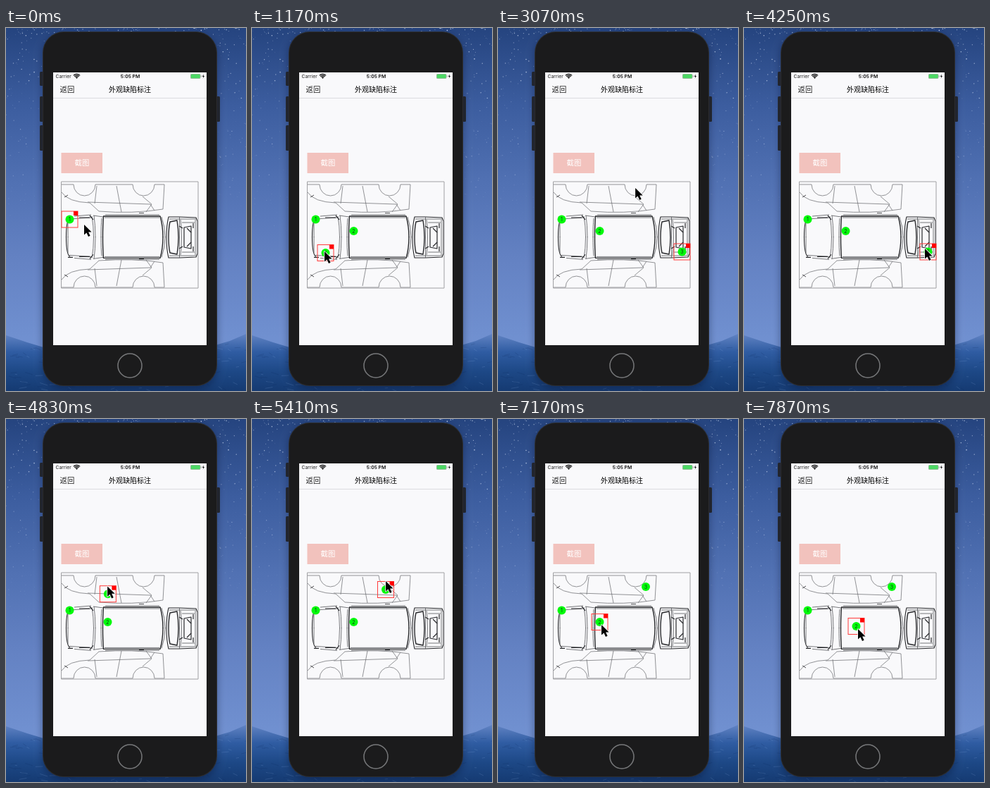
Animation of 341x515 px, one loop 8 s. Source, as an HTML page with a canvas:

```html
<!DOCTYPE html>
<html lang="zh-CN">
<head>
<meta charset="utf-8">
<title>外观缺陷标注</title>
<style>
html, body { margin: 0; width: 100%; height: 100%; overflow: hidden; background: #1b1b1b; }
canvas { display: block; width: 341px; height: 515px; }
</style>
</head>
<body>
<canvas id="stage"></canvas>
<script>
const W = 341, H = 515, LOOP = 8000, TICK = 117.4;
const LATIN = '"Inter", "Roboto", sans-serif';
const HAN = '"Noto Sans CJK SC", "Noto Sans CJK", sans-serif';
const PALE = '#77787c', INK = '#55565a', DARK = '#26272a';
const dpr = window.devicePixelRatio || 1;

function sized(c) {
  c.width = W * dpr;
  c.height = H * dpr;
  const g = c.getContext('2d');
  g.scale(dpr, dpr);
  return g;
}

const view = sized(document.getElementById('stage'));
const backdrop = document.createElement('canvas');
const ctx = sized(backdrop);

const clamp = (v, lo, hi) => Math.min(hi, Math.max(lo, v));
const mix = (a, b, k) => a + (b - a) * k;
const smooth = k => k * k * (3 - 2 * k);

function seeded(seed) {
  return () => (seed = (seed * 16807) % 2147483647) / 2147483647;
}

function rect(g, x, y, w, h, fill) {
  g.fillStyle = fill;
  g.fillRect(x, y, w, h);
}

function round(g, x, y, w, h, r, fill) {
  g.beginPath();
  g.roundRect(x, y, w, h, r);
  g.fillStyle = fill;
  g.fill();
}

function arc(g, x, y, r, from = 0, to = Math.PI * 2) {
  g.beginPath();
  g.arc(x, y, r, from, to);
}

function disc(g, x, y, r, fill) {
  arc(g, x, y, r);
  g.fillStyle = fill;
  g.fill();
}

function trace(d, color = INK, width = 0.8) {
  ctx.strokeStyle = color;
  ctx.lineWidth = width;
  ctx.stroke(new Path2D(d));
}

function label(g, str, x, y, font, color, align = 'center') {
  g.font = font;
  g.fillStyle = color;
  g.textAlign = align;
  g.fillText(str, x, y);
}

function fade(top, bottom, colors) {
  const g = ctx.createLinearGradient(0, top, 0, bottom);
  colors.forEach((c, i) => g.addColorStop(i / (colors.length - 1), c));
  return g;
}

// Draws a half, then its reflection across a horizontal axis.
function mirrored(axis, draw) {
  draw();
  ctx.save();
  ctx.translate(0, 2 * axis);
  ctx.scale(1, -1);
  draw();
  ctx.restore();
}

function drawSky() {
  const rnd = seeded(77);
  rect(ctx, 0, 0, W, H, fade(0, 440, ['#25447f', '#3c5d9f', '#5171b3', '#6482c3', '#7090d0']));
  for (let i = 0; i < 700; i++) {
    const x = rnd() * W, y = rnd() ** 1.5 * 290;
    ctx.globalAlpha = (0.25 + rnd() * 0.65) * (1 - y / 320);
    disc(ctx, x, y, 0.3 + rnd() * 0.55, '#e2ecff');
  }
  ctx.globalAlpha = 1;

  ctx.fillStyle = fade(432, H, ['#6586c6', '#2f5ca2', '#1d4886', '#153a72']);
  ctx.fill(new Path2D('M0 436L30 446 60 455H280L318 444 341 434V515H0Z'));
  ctx.globalAlpha = 0.16;
  for (let i = 0; i < 160; i++) {
    const x = rnd() * W, y = 448 + rnd() * 66;
    trace(`M${x} ${y}l${3 + rnd() * 8} ${rnd() * 6 - 2}`, i % 2 ? '#9dbdf0' : '#0a2350', 1);
  }
  ctx.globalAlpha = 1;
}

function drawPhone() {
  [[48, 62, 20], [48, 97, 36], [48, 138, 36], [298, 97, 36]]
    .forEach(([x, y, h]) => round(ctx, x, y, 6, h, 1.5, '#26282d'));
  ctx.shadowColor = 'rgba(5, 15, 45, .4)';
  ctx.shadowBlur = 12 * dpr;
  ctx.shadowOffsetY = 4 * dpr;
  round(ctx, 52, 5, 248, 503, 30, '#2c2d30');
  ctx.shadowColor = 'transparent';
  round(ctx, 53, 6, 246, 501, 29, '#1b1b1c');
  arc(ctx, 176, 479, 17);
  ctx.strokeStyle = '#77787a';
  ctx.lineWidth = 1.5;
  ctx.stroke();
  rect(ctx, 67, 63, 218, 387, '#f9f9fb');
}

function drawBars() {
  label(ctx, 'Carrier', 70.5, 71.2, `6.8px ${LATIN}`, '#222', 'left');
  ctx.lineWidth = 1.2;
  ctx.strokeStyle = '#111';
  for (let r = 2.6; r < 7; r += 1.9) {
    arc(ctx, 100.5, 71.8, r, -Math.PI * 0.76, -Math.PI * 0.24);
    ctx.stroke();
  }
  disc(ctx, 100.5, 70.9, 0.9, '#111');
  label(ctx, '5:05 PM', 176.5, 71.2, `600 6.8px ${LATIN}`, '#111');

  round(ctx, 262, 65, 14.4, 7, 1.6, '#a9b3aa');
  round(ctx, 262.7, 65.7, 13, 5.6, 1, '#4cd964');
  rect(ctx, 276.8, 67.4, 0.8, 2.2, '#888');
  ctx.fillStyle = '#111';
  ctx.fill(new Path2D('M281 65.6L278.8 69H280.3L279.7 71.6 282 68.1H280.5Z'));

  label(ctx, '返回', 76.5, 91, `10.4px ${HAN}`, '#222', 'left');
  label(ctx, '外观缺陷标注', 176, 90.6, `500 10px ${HAN}`, '#000');
  rect(ctx, 67, 99, 218, 1, '#dcdcdf');
  rect(ctx, 78.5, 177, 58.5, 29, '#f2c2bd');
  label(ctx, '截图', 108, 195.3, `10.4px ${HAN}`, '#fff');
}

function drawSide() {
  trace('M79 222H96M127 222H180M211 222H225', PALE);
  for (const x of [111.5, 195.5]) {
    trace(`M${x - 15.5} 222A15.5 16 0 0 0 ${x + 15.5} 222`, PALE);
  }
  trace('M79 233Q88 247 119 248L132 260Q180 264 223 257L225 222', PALE);
  trace('M116 247L205 250 211 259M157 224L164 261M129 224L126 249M194 239L207 250 199 261', PALE);
  trace('M83 240L88 237M189 262.5H196', DARK);
}

function drawTopHalf() {
  trace('M85.5 297Q85.5 272 91 269', DARK, 1.1);
  trace('M88 297V274M90 271L121 269M97 267L121 265M124 266L138 268M135 297Q135 280 136 270M141 265H218');
  trace('M88 268H95M104 269H119M119 266L124 272', DARK, 1.2);
  trace('M124.5 297Q124.5 280 122 267M127 297Q127 280 125 266', INK);
  trace('M137.5 297Q137.5 280 138.5 267H219Q223 281 223 297', DARK, 1.4);
  trace('M140 269H218M221 268Q226 282 226 297');
}

function drawRearHalf() {
  trace('M228 297Q228 280 231 268L246 268 270 269 272 274V297', DARK, 1.1);
  trace('M231 297Q231 284 233 275L243 273Q245 285 245 297', DARK, 1.4);
  trace('M246.5 297V268M249.5 297Q249.5 282 248 272M269 297V270M232 271H268M250 276H268');
  trace('M253 297V283L263 281V297', DARK, 1.2);
  trace('M257 284L263 290M266 277V284M246 281L251 284', DARK, 1.2);
}

function drawDiagram() {
  ctx.lineJoin = 'round';
  mirrored(295, drawSide);
  mirrored(296.7, drawTopHalf);
  mirrored(297, drawRearHalf);
  ctx.strokeStyle = '#a0a0a3';
  ctx.lineWidth = 1;
  ctx.strokeRect(78.5, 218, 194.5, 151);
}

// Pointer stops: x, y, ticks to get there, ticks to rest.
const stops = [
  [111, 279, 0], [143, 287, 3, 1], [103, 317, 5, 6],
  [113, 363, 2], [245, 256, 2], [283, 288, 1], [261, 315.5, 1],
  [265, 279, 1], [187, 221, 5], [203, 244, 2, 2], [257, 313, 5],
  [242, 256, 2], [126, 234, 4], [190, 230, 4], [167, 219, 2], [210, 226, 4],
  [206, 226, 1, 2], [147, 292, 6, 3], [162, 298, 3]
];

function pointer(tick) {
  let [px, py] = stops[0];
  for (const [x, y, travel, rest = 0] of stops) {
    if (tick < travel) {
      const k = smooth(tick / travel);
      return [mix(px, x, k), mix(py, y, k)];
    }
    tick = Math.max(0, tick - travel - rest);
    [px, py] = [x, y];
  }
  return [px, py];
}

// Follows the pointer inside the diagram; the grip may slip to a new offset.
function drag(tick, start, end, home, slip) {
  if (tick <= start) return home;
  const grabbed = pointer(start), at = pointer(Math.min(tick, end));
  const k = Math.min(1, (tick - start) / 6);
  const [x, y] = at.map((v, i) => {
    const grip = home[i] - grabbed[i];
    return v + (slip ? mix(grip, slip[i], k) : grip);
  });
  return [clamp(x, 90.5, 261.5), clamp(y, 230, 357.5)];
}

function drawMarker(n, [x, y], selected) {
  disc(view, x, y, 6, '#00fa0a');
  label(view, n, x, y + 2.6, `7px ${LATIN}`, '#143c14');
  if (!selected) return;
  view.strokeStyle = '#ff3a3a';
  view.lineWidth = 1;
  view.strokeRect(x - 11.5, y - 11.5, 23, 23);
  rect(view, x + 5.5, y - 11.5, 6, 6, '#ff0000');
}

const arrow = new Path2D('M0 0V14.5L3.4 11.4 6 17 8.6 15.8 6.1 10.4H10.6Z');

function drawPointer([x, y]) {
  view.save();
  view.translate(x, y);
  view.lineJoin = 'round';
  view.strokeStyle = '#fff';
  view.lineWidth = 1.6;
  view.stroke(arrow);
  view.fillStyle = '#000';
  view.fill(arrow);
  view.restore();
}

function selectedAt(tick) {
  if (tick < 4) return 1;
  if (tick < 9) return 2;
  return tick < 60 ? 3 : 2;
}

function render(now) {
  const tick = Math.floor((now % LOOP) / TICK + 0.05);
  const chosen = selectedAt(tick);
  view.drawImage(backdrop, 0, 0, W, H);
  drawMarker(1, [90.5, 271.5], chosen === 1);
  if (tick >= 4) drawMarker(2, drag(tick, 64, 67, [144.5, 288]), chosen === 2);
  if (tick >= 9) {
    const dropped = drag(tick, 15, 21, [104.5, 319]);
    drawMarker(3, drag(tick, 36, 52, dropped, [0, 12]), chosen === 3);
  }
  drawPointer(pointer(tick));
}

drawSky();
drawPhone();
drawBars();
drawDiagram();

const start = performance.now();
function loop() {
  render(performance.now() - start);
  requestAnimationFrame(loop);
}
loop();
</script>
</body>
</html>
```
